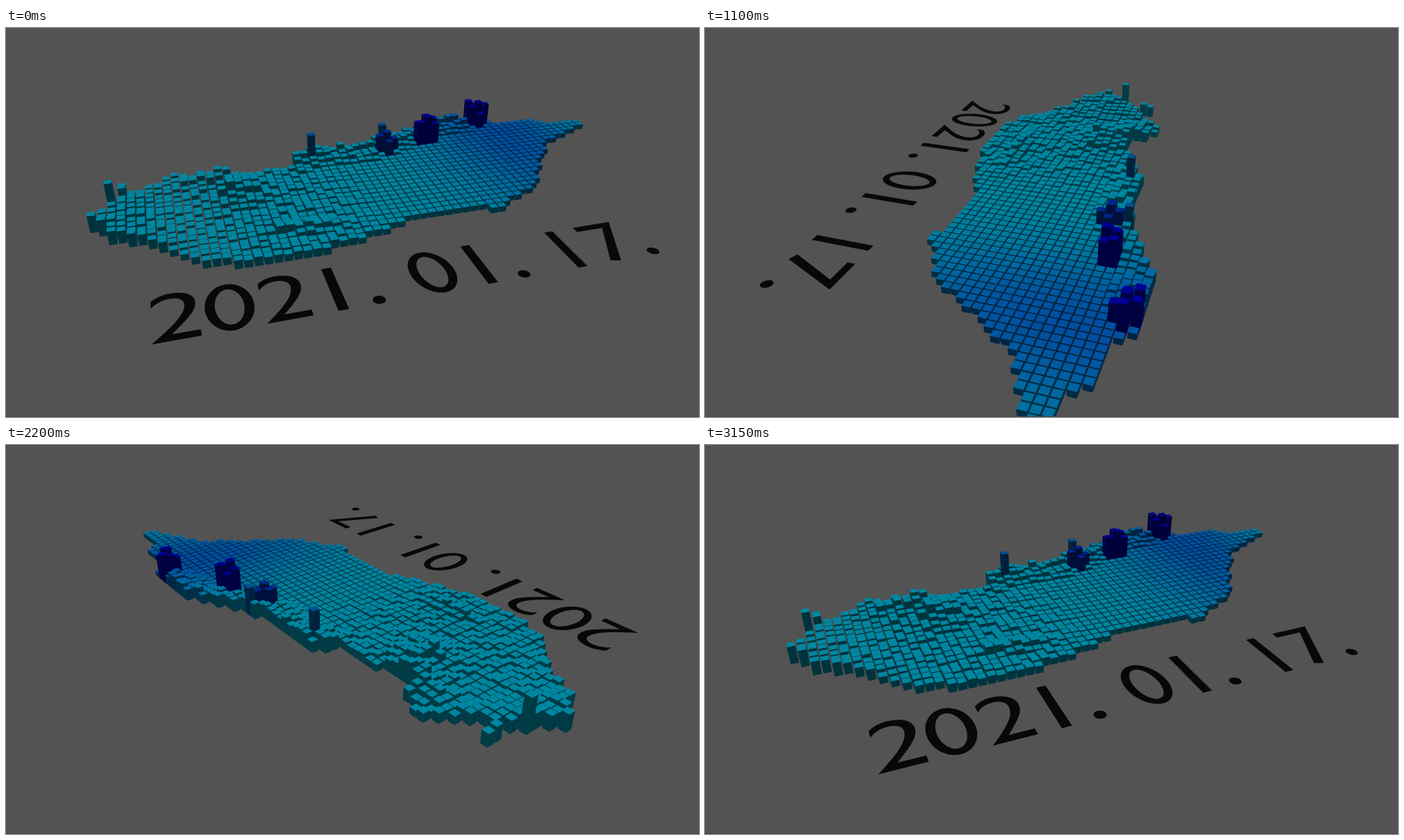
Animation, 998 px wide and 561 px high, one loop 3200 ms. Source, as an HTML page with a canvas:

```html
<!DOCTYPE html>
<html lang="en">
<head>
<meta charset="utf-8">
<title>2021. 01. 17.</title>
<style>
html, body { margin: 0; width: 100%; height: 100%; overflow: hidden; background: #535353; }
canvas { display: block; }
</style>
</head>
<body>
<canvas id="stage" width="998" height="561" role="img" aria-label="2021. 01. 17."></canvas>
<script>
const ctx = document.getElementById('stage').getContext('2d');

// Camera: focal length equals the distance to the turning axis.
const F = 976, CX = 503.5, CY = 280.5, LIFT = 44.8;
const SIN = 0.5214, COS = 0.8533;
const STEP = 50, STEPS = 64;
let ca = 1, sa = 0;

function project(p, q, z) {
  const x = p * ca - q * sa, y = p * sa + q * ca;
  const k = F / (F + y * COS - z * SIN);
  return [CX + x * k, CY - (LIFT + y * SIN + z * COS) * k];
}

function trace(points) {
  points.forEach(([x, y], n) => n ? ctx.lineTo(x, y) : ctx.moveTo(x, y));
  ctx.closePath();
}

// ---- Terrain ----
const CELL = 12.14, P0 = -363, Q0 = -148, COLS = 66, SIZE = 0.83;
const NAVY = [0, 0, 150], DEEP = [0, 38, 140], MID = [0, 80, 145];
const TEAL = [0, 134, 160], BLUE = [0, 72, 160];

// Key points (column, row) of the two coasts, joined by straight lines
const near = [[0, 11], [2, 8], [6, 6], [11, 1.4], [15, 0], [22, 0], [30, 2],
  [33, 4], [44, 3.4], [50, 7], [58, 18], [65, 21]];
const far = [[0, 12], [3, 16], [6, 18], [9, 21], [12, 20], [13, 18], [23, 19],
  [25, 22], [36, 22.6], [44, 27], [52, 27], [54, 25], [59, 25], [61, 23], [65, 23]];

const peaks = [
  { i: 2, j: 14, z: 50, r: 0.5 },
  { i: 26, j: 20, z: 52, r: 0.5, color: MID },
  { i: 36, j: 22, z: 44, r: 0.5, color: MID },
  { i: 36, j: 20, z: 42, r: 1.1, color: DEEP },
  { i: 42, j: 21.5, z: 56, r: 1.2, color: NAVY },
  { i: 50.8, j: 25.3, z: 50, r: 1.35, color: NAVY }
];

const clamp = v => Math.max(0, Math.min(1, v));
const noise = (i, j) => {
  const v = Math.sin(i * 12.9898 + j * 78.233) * 43758.5453;
  return v - Math.floor(v);
};
const bump = (p, q, pc, qc, sp, sq) =>
  Math.exp(-((p - pc) ** 2) / (2 * sp * sp) - ((q - qc) ** 2) / (2 * sq * sq));

function coast(keys, i) {
  const n = Math.max(1, keys.findIndex(k => k[0] >= i));
  const [a, u] = keys[n - 1], [b, v] = keys[n];
  return Math.round(u + (v - u) * (i - a) / (b - a));
}

function heightAt(i, j, p, q, end) {
  const n = noise(i, j);
  let z = 8.5 + n * 5 * clamp((40 - p) / 120) + 13 * clamp((-250 - p) / 105);
  z += (14 + 12 * n) * bump(p, q, -165, 22, 26, 18);
  z += (11 + 9 * n) * bump(p, q, -195, 66, 30, 14);
  z += (6 + 4 * n) * bump(p, q, -105, -94, 42, 9);
  if (i > 23 && i < 50) z += Math.max(0, 5 - end + j) * (1.5 + 2.6 * n);
  return z;
}

const rgb = (c, k) => `rgb(${c.map(v => Math.round(v * k))})`;

function makeBlock(i, j, end) {
  const p = P0 + (i + 0.5) * CELL, q = Q0 + (j + 0.5) * CELL;
  let z = heightAt(i, j, p, q, end);
  const m = 0.9 * bump(p, q, 285, 120, 90, 190);
  let c = TEAL.map((v, n) => v + (BLUE[n] - v) * m);
  for (const k of peaks) {
    const d = Math.hypot(i - k.i, j - k.j);
    if (d > k.r) continue;
    z = k.z - d * (2 + 12 * noise(j, i));
    c = k.color || c;
  }
  return { p, q, z, top: rgb(c, 1), ends: rgb(c, 0.43), front: rgb(c, 0.38), back: rgb(c, 0.44) };
}

const blocks = [];
function addColumn(i, start, end) {
  for (let j = start; j < end; j++) blocks.push(makeBlock(i, j, end));
}
for (let i = 0; i < COLS; i++) addColumn(i, coast(near, i), coast(far, i));
addColumn(3, 17, 19);

function fillQuad(color, ...pts) {
  ctx.fillStyle = color;
  ctx.beginPath();
  trace(pts);
  ctx.fill();
}

function drawBlock(b, cp, cq) {
  const h = CELL * SIZE / 2;
  const corners = [[-h, -h], [h, -h], [h, h], [-h, h]];
  const low = corners.map(([u, v]) => project(b.p + u, b.q + v, 0));
  const high = corners.map(([u, v]) => project(b.p + u, b.q + v, b.z));
  const side = (n, color) => {
    const m = (n + 1) % 4;
    fillQuad(color, low[n], low[m], high[m], high[n]);
  };
  if (cq < b.q - h) side(0, b.front);
  if (cp > b.p + h) side(1, b.ends);
  if (cq > b.q + h) side(2, b.back);
  if (cp < b.p - h) side(3, b.ends);
  fillQuad(b.top, ...high);
}

// ---- Date lying on the ground ----
const BASE = -256.5;

function ellipse(rx, ry, cy) {
  return Array.from({ length: 48 }, (_, n) => {
    const a = n * Math.PI / 24;
    return [rx * Math.cos(a), cy + ry * Math.sin(a)];
  });
}

// Pairs are corners, sextets are cubic curves.
function outline(segments) {
  const out = [];
  for (const s of segments) {
    if (s.length === 2) { out.push(s); continue; }
    const [x, y] = out[out.length - 1];
    for (let n = 1; n <= 10; n++) {
      const t = n / 10, r = 1 - t;
      const mix = (a, b, c, d) => r*r*r*a + 3*r*r*t*b + 3*r*t*t*c + t*t*t*d;
      out.push([mix(x, s[0], s[2], s[4]), mix(y, s[1], s[3], s[5])]);
    }
  }
  return out;
}

const glyphs = {
  '0': [ellipse(27, 42, 41), ellipse(16, 32, 41)],
  '1': [[[-6, 0], [6, 0], [6, 82], [-6, 82]]],
  '2': [outline([[-25, 0], [0, 26, 12, 42, 12, 59], [12, 68, 6, 73, -3, 73],
    [-11, 73, -18, 69, -24, 61], [-24, 73], [-18, 79.5, -10, 83, -2, 83],
    [14, 83, 24, 74, 24, 60], [24, 44, 14, 32, -4, 10.5], [26, 10.5], [26, 0]])],
  '7': [[[-24, 82], [30, 82], [-8, -1], [-20, 3], [13, 71.5], [-24, 71.5]]],
  '.': [ellipse(7.4, 7.4, 6.5)]
};

// A word's digits stand 60 apart, its dot 43 after the last one.
const words = [['2021', -267], ['01', 33], ['17', 211]];

function drawGlyph(ch, p) {
  ctx.beginPath();
  for (const loop of glyphs[ch]) trace(loop.map(([x, y]) => project(p + x, BASE + y, 0)));
  ctx.fill('evenodd');
}

function drawDate() {
  ctx.fillStyle = '#080808';
  for (const [word, start] of words) {
    [...word].forEach((ch, n) => drawGlyph(ch, start + n * 60));
    drawGlyph('.', start + (word.length - 1) * 60 + 43);
  }
}

function draw(step) {
  const a = (16 - step * 360 / STEPS) * Math.PI / 180;
  ca = Math.cos(a);
  sa = Math.sin(a);
  ctx.fillStyle = '#535353';
  ctx.fillRect(0, 0, 998, 561);
  drawDate();
  const dist = -(F * COS + LIFT * SIN);
  const cp = dist * sa, cq = dist * ca;
  for (const b of blocks) b.far = (b.p - cp) ** 2 + (b.q - cq) ** 2;
  blocks.sort((u, v) => v.far - u.far);
  for (const b of blocks) drawBlock(b, cp, cq);
  ctx.fillStyle = '#484848';
  ctx.fillRect(0, 560, 998, 1);
}

let shown = -1;
function tick() {
  const step = Math.floor(performance.now() / STEP) % STEPS;
  if (step !== shown) draw(shown = step);
  requestAnimationFrame(tick);
}
tick();
</script>
</body>
</html>
```
